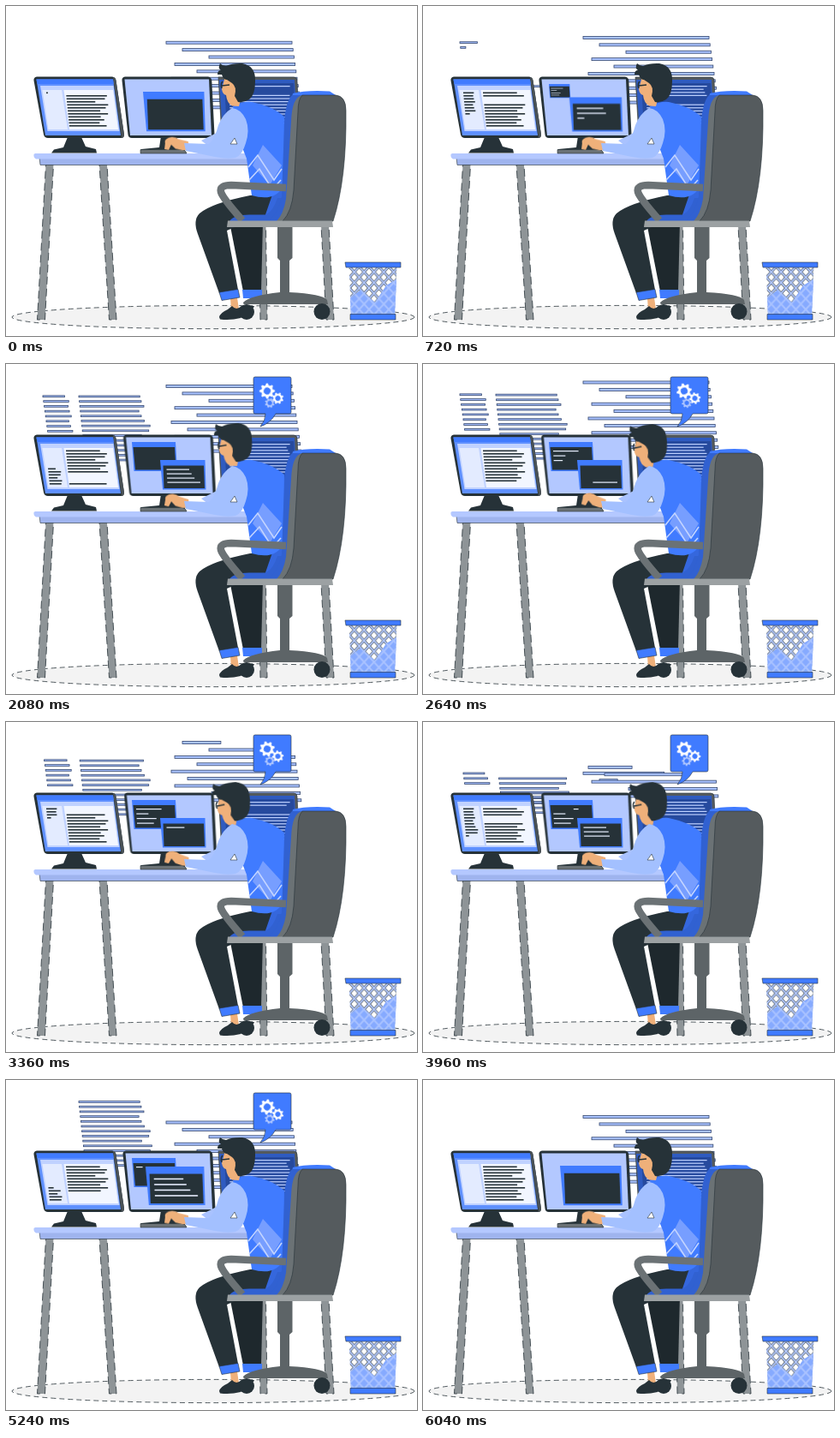
Recreate the animation shown at these times as an HTML page. Size 480 by 385 pixels, loop 6080 ms.

```html
<!DOCTYPE html>
<html lang="en">
<head>
<meta charset="utf-8">
<title>Programmer at a desk</title>
<style>
  html, body { margin: 0; width: 100%; height: 100%; overflow: hidden; background: #fff; }
  svg { display: block; width: 100vw; height: 100vh; }
  .ink { fill: #263238; }
  .blue { fill: #407bff; }
  .skin { fill: #efb07a; }
  .pale { fill: #a9c2ff; }
  .leg { fill: #8e9497; stroke: #263238; stroke-width: .8; stroke-dasharray: 9 5; }
  .edge { stroke: #263238; stroke-width: .6; }
  .fly rect { fill: #a9c2ff; stroke: #34476e; stroke-width: .8; }
  .head, .bubble, .win1, .win2, .mid { animation: 6080ms linear infinite; }
  .head { animation-name: nod; transform-origin: 275px 118px; }
  .bubble { animation-name: pop; transform-origin: 298px 73px; }
  .win1 { animation-name: open; transform-origin: 147px 91px; }
  .win2 { animation-name: resize; transform-origin: 0 0; }
  .mid { animation-name: nudge; }
  .hand { animation: type 380ms ease-in-out infinite alternate; transform-origin: 214px 164px; }
  .gear { transform-box: fill-box; transform-origin: center; animation: spin 6080ms linear infinite; }
  .back { animation-direction: reverse; }
  @keyframes nod {
    0%, 30%, 85%, 100% { transform: none; }
    37%, 76% { transform: translate(-3.5px, 3px) rotate(-5deg); }
  }
  @keyframes pop {
    0%, 14% { transform: scale(0); }
    19%, 95.5% { transform: scale(1); }
    98.5%, 100% { transform: scale(0); }
  }
  @keyframes open {
    0%, 9% { transform: scale(0); }
    15%, 93% { transform: scale(1); }
    96%, 100% { transform: scale(0); }
  }
  @keyframes resize {
    0%, 7% { transform: translate(160px, 100px) scale(1.36, 1.34); }
    16%, 76% { transform: translate(180px, 112px) scale(1); }
    86% { transform: translate(163px, 101px) scale(1.3); }
    93%, 100% { transform: translate(160px, 100px) scale(1.36, 1.34); }
  }
  @keyframes nudge {
    0%, 30%, 90%, 100% { transform: none; }
    37%, 80% { transform: translateX(2.5px); }
  }
  @keyframes type { from { transform: rotate(-2deg); } to { transform: rotate(5deg); } }
  @keyframes spin { to { transform: rotate(360deg); } }
</style>
</head>
<body>
<svg viewBox="0 0 480 385" preserveAspectRatio="none">
  <defs>
    <pattern id="mesh" x="401" y="304" width="11.500" height="12.500" patternUnits="userSpaceOnUse">
      <path d="M-1 -1.087 12.500 13.587M12.500 -1.087 -1 13.587" stroke="#263238" stroke-width="3"/>
      <path d="M-1 -1.087 12.500 13.587M12.500 -1.087 -1 13.587" stroke="#b5caff" stroke-width="1.800"/>
    </pattern>
    <pattern id="softMesh" x="401" y="304" width="11.500" height="12.500" patternUnits="userSpaceOnUse">
      <path d="M-1 -1.087 12.500 13.587M12.500 -1.087 -1 13.587" stroke="#a9c2ff" stroke-width="2"/>
    </pattern>
  </defs>

  <ellipse cx="242" cy="363" rx="235" ry="13.6" fill="#f3f3f3" stroke="#263238" stroke-width=".8" stroke-dasharray="6 4"/>

  <g class="fly" id="fly"></g>

  <!-- right monitor -->
  <path class="edge" fill="#555b5e" d="M248 83H336Q340 83 340 87L343 152H252Z"/>
  <path fill="#2f5bc0" d="M249 86H337L340 149H253Z"/>
  <path fill="#264a9e" d="M255 90H336L339 145H258Z"/>
  <g id="rightCode" fill="#bdd0ff"></g>

  <!-- left monitor -->
  <path class="ink" d="M72 153H88L93 164 105 167 106 171.500H53L56 167.500 67 165Z"/>
  <path class="ink" d="M36 82.500H124Q128 83 128.500 87L138 150Q138 154 134 154H49Q45 154 44 150L32.500 87Q32 83 36 82.500Z"/>
  <path fill="#4a5256" d="M125 83Q128 83 128.500 87L138 150Q138 154 135 154Z"/>
  <path fill="#5f90ff" d="M35.500 85.500H125L134 151H46Z"/>
  <path class="blue" d="M35.500 85.500H125L125.800 91H36.500Z"/>
  <path fill="#c0d2ff" d="M40 93H125.500L132.500 146H48.500Z"/>
  <path fill="#e3ebff" d="M42.500 98H65L72 144H49.500Z"/>
  <path fill="#f2f6ff" d="M67.500 98H125L131 144H74Z"/>
  <g id="leftCode" class="ink"></g>

  <!-- middle monitor -->
  <path class="ink" d="M181 152H199L202 165H209V171H158V167L179 165Z"/>
  <g class="mid">
    <path class="ink" d="M139 82.500H236Q240 83 240.300 87L243.500 150Q243 154 239 154H147Q143 154 142.500 150L135.500 87Q135 83 139 82.500Z"/>
    <path fill="#b3c8ff" d="M138.500 85.500H237L240 151H145Z"/>
  </g>
  <g class="win1">
    <path class="blue" d="M147 91H198L200 125H149.500Z"/>
    <path class="ink" d="M148.500 97H197L198.500 123.500H151Z"/>
    <g id="text1" fill="#e8efff"></g>
  </g>
  <g class="win2">
    <path class="blue" d="M0 0H52.500L53.500 34.500H3Z"/>
    <path class="ink" d="M3.500 6.500H51L52 33H4.500Z"/>
    <g id="text2" fill="#e8efff"></g>
  </g>

  <!-- desk -->
  <path class="leg" d="M46.500 185H55.500L45.500 366H36.500Z"/>
  <path class="leg" d="M109 185H118L129 366H120.500Z"/>
  <path class="leg" d="M295 256H303.500L305 366H297Z"/>
  <path class="leg" d="M368 256H377L383 366H374Z"/>
  <path class="edge" fill="#9fb4ee" d="M39 177H292V185.500H40Z"/>
  <path fill="#b4c8ff" d="M34 172H292V178.500H35Q32 177 32.500 173Z"/>
  <path class="edge" fill="#6b7275" d="M157 167.500H206Q210 168 211 172H157Z"/>

  <!-- legs and shoe -->
  <path fill="#1e282d" d="M261 252H300L298 333H277Z"/>
  <path class="blue" d="M276 331H299V341H277Z"/>
  <path class="skin" d="M262 341L270 340 272 354H263Z"/>
  <path class="ink" d="M312 220L285 221Q240 230 226 242Q218 250 224 266L249 335 271 331 258 262Q282 250 326 248Z"/>
  <path class="blue edge" d="M249 334L271 330.500L273 340L252 343.500Z"/>
  <path class="ink" d="M249 363Q250 358 259 354L264 350Q269 356 275 350H290Q289 354 283 355L274 364Q262 367 250 365.500Z"/>

  <!-- far arm, torso -->
  <path class="pale" d="M228 157L250 146 262 158 236 163Z"/>
  <path fill="#3567dd" d="M326 125L338 100 330 252H300L318 200Z"/>
  <path class="blue" d="M265 117Q276 111 287 112Q312 117 325 129L324 210Q314 229 287 221L281 178 270 150Z"/>
  <path fill="#779eff" d="M300 162L322 186 308 209 288 186Z"/>
  <path fill="none" stroke="#c3d4ff" stroke-width="1.600" d="M283 188L294 174 313 203 322 190M284 203L296 190 311 214 321 203"/>
  <path fill="#3161d1" d="M261 251Q266 243.500 284 243.500H303Q312 240 317 224H331V251Z"/>

  <!-- head -->
  <g class="head">
    <path class="skin" d="M256 82L252 97Q253 103 257 104Q258 113 264 116.500L272 117 275 106 268 84Z"/>
    <path class="ink" d="M247 80Q247 75 251 75Q247 72 250 67Q253 70 257 70Q264 66.500 276 67Q292 70 291 88Q291 104 284 109Q278 113 271 112L267 105Q270 94 264 90L258 86Q254 86 252 80Z"/>
    <path class="skin" d="M263 90Q258 91 260 97Q263 102 267 99Z"/>
    <path fill="none" stroke="#263238" stroke-width="1.500" d="M261 92L252 93M253 88Q250 91 252 96"/>
  </g>

  <!-- near arm and hand -->
  <g class="hand">
    <path class="skin" d="M213 158L202 155Q197 151 190 153Q185 155 186 159L185 166 190 167 193 161 198 166 206 168 214 168Z"/>
  </g>
  <path fill="#a3c0ff" d="M264 119Q274 120 280 132Q285 145 280 160Q276 174 268 177Q258 179 244 176L210 169 208 160 237 161Q244 155 248 139Q253 126 264 119Z"/>
  <path fill="#fff" class="edge" d="M262 161L267 154 270 161Z"/>

  <!-- chair -->
  <path class="blue" d="M335 102Q350 98 378 99.500L385 104 333 111Z"/>
  <path fill="#3161d1" d="M334 104Q326 112 325 140L322 222Q318 242 306 251H330L346 104Z"/>
  <path fill="#6b7275" d="M346 104Q334 106 333 135L327 225Q324 243 316 251H340L352 104Z"/>
  <path class="edge" fill="#555b5e" d="M346 104H385Q397 105 397 122Q398 202 382 251H323Q334 240 336 215L341 123Q341 109 346 104Z"/>
  <path fill="none" stroke="#6b7275" stroke-width="8.500" stroke-linejoin="round" d="M327 212L263 209Q249 209 251 217Q253 224 276 250"/>
  <path fill="#9ca1a3" d="M259 250.500H381L382 258H258Z"/>
  <path fill="#5d6467" d="M317 258H334.500V294L331 297V334Q370 336 375 343L376 348H282Q277 349 277 346Q284 338 320 334V297L317 294Z"/>
  <g class="ink"><circle cx="281" cy="357" r="9"/><circle cx="369" cy="356.500" r="9.500"/></g>

  <!-- bin -->
  <path fill="#fff" d="M400.500 304H456.500L454 361H403Z"/>
  <path fill="url(#mesh)" d="M400.500 304H456.500L454 361H403Z"/>
  <g id="paper">
    <path fill="#86aaff" d="M402 341L414 331 431 346 444 326 456 319 454 361H403Z"/>
    <path fill="url(#softMesh)" d="M402 341L414 331 431 346 444 326 456 319 454 361H403Z"/>
  </g>
  <path class="blue edge" d="M396 299H461V305H397Z"/>
  <path class="blue edge" d="M402 359.500H455V366H402Z"/>

  <g class="bubble">
    <path class="blue edge" d="M291 15H331Q333 15 333 17V56Q333 58 331 58H315Q309 69 297 73Q303 66 303 58H291Q289 58 289 56V17Q289 15 291 15Z"/>
    <g id="gears"></g>
  </g>
</svg>
<script>
const LOOP = 6080, HALF = LOOP / 2;
const $ = id => document.getElementById(id);
const clamp = v => Math.max(0, Math.min(1, v));
const mod = (a, n) => ((a % n) + n) % n;
const noise = n => mod(Math.sin(n * 12.9898) * 43758.5453, 1);

function add(parent, tag, attrs) {
  const el = document.createElementNS('http://www.w3.org/2000/svg', tag);
  for (const k in attrs) el.setAttribute(k, attrs[k]);
  return parent.appendChild(el);
}

function setWidth(el, w) {
  el.setAttribute('width', w.toFixed(2));
  el.style.display = w < .3 ? 'none' : '';
}

// Rising code lines: each grows from its left end, then shrinks back to it
function batch(o) {
  const bars = [];
  for (let i = 0; i < o.n; i++) {
    bars.push(add($('fly'), 'rect', { x: o.x(i), height: o.h }));
  }
  return time => bars.forEach((bar, i) => {
    const order = (i + (o.shift || 0)) % o.n;
    const grown = clamp((time - o.start - order * o.step) / o.grow);
    const gone = clamp((time - o.end - i * o.endStep) / o.shrink);
    setWidth(bar, o.w(i) * grown * (1 - gone));
    bar.setAttribute('y', o.top - o.speed * (time - o.at) / 1000 + i * o.gap);
  });
}

const indent = [187, 206, 237, 197, 223, 193, 212, 197, 240, 222];
const rightSide = { n: 10, h: 3, x: i => indent[i], w: i => 334 + i * 1.2 - indent[i],
  top: 53.8, at: 4520, speed: 8.05, gap: 8.4, start: 3800, step: 120, grow: 250,
  end: 2950 + LOOP, endStep: 150, shrink: 400 };
const column = { n: 14, h: 1.8, shift: 5, x: i => 85 + i * .6, w: i => 66 + 14 * noise(i + 4),
  gap: 5.7, grow: 150 };
const margin = { n: 8, h: 1.8, x: i => 43 + i * .8, w: i => 25 + 8 * noise(i + 2),
  top: 39, at: 1480, speed: 3.6, gap: 5.8, start: 600, step: 90, grow: 150,
  end: 2950, endStep: 200, shrink: 200 };
const batches = [
  batch(margin),
  batch({ ...column, top: 39, at: 1480, speed: 3.3, start: 600, step: 70, end: 3060, endStep: 150, shrink: 150 }),
  batch({ ...column, top: 27.5, at: 4520, speed: 4, start: 3750, step: 55, end: 5350, endStep: 40, shrink: 130 }),
  batch(rightSide)
];
const lastBatch = batch(rightSide);

// Code on the screens
function codeRows(id, n, x, y, gap, slant, width, height) {
  return Array.from({ length: n }, (_, i) => {
    const top = y + i * gap, w = width(i);
    const el = add($(id), 'rect', { x: x + i * gap * slant, y: top, height });
    return { el, y: top, w };
  });
}
const mainRows = codeRows('leftCode', 12, 70, 100.5, 3.5, .1, i => 30 + 18 * noise(i + 9), 1.6);
const sideRows = codeRows('leftCode', 12, 47, 100.5, 3.5, .1, i => 9 + 6 * noise(i + 3), 1.6);
const rightRows = codeRows('rightCode', 13, 260, 93, 3.6, .05, i => 66 + 9 * noise(i + 6), 1.2);
const rows1 = codeRows('text1', 4, 152, 101, 5.5, .06, i => 13 + 18 * noise(i + 1), 1.2);
const rows2 = codeRows('text2', 4, 7.5, 10.5, 5, .06, i => 24 + 15 * noise(i + 7), 1.2);

function typed(rows, s, start, step, end, endStep) {
  rows.forEach((r, i) => {
    const on = clamp((s - start - i * step) / step);
    const off = clamp((s - end - i * endStep) / endStep);
    setWidth(r.el, r.w * on * (1 - off));
    r.el.style.transform = `translateX(${r.w * off}px)`;
  });
}

// Gears
function gear(x, y, r, teeth, fill, cls) {
  const pts = [];
  for (let i = 0; i < teeth * 4; i++) {
    const a = (i + .5) / (teeth * 4) * Math.PI * 2;
    const d = i % 4 < 2 ? r : r * .75;
    pts.push([x + d * Math.cos(a), y + d * Math.sin(a)].map(v => v.toFixed(2)).join());
  }
  const g = add($('gears'), 'g', { class: 'gear ' + cls });
  add(g, 'polygon', { points: pts.join(' '), fill });
  add(g, 'circle', { cx: x, cy: y, r: r * .45, fill: '#407bff' });
}
gear(305, 31.5, 9, 8, '#fff', '');
gear(317.5, 40, 6.8, 8, '#fff', 'back');
gear(308, 45.5, 5.8, 8, '#b3c9ff', 'back');

function draw(now) {
  const t = mod(now - begin, LOOP), s = (t % HALF) / 1000;
  batches.forEach(b => b(t));
  lastBatch(t + LOOP);

  const hole = 97 + 17 * s;
  mainRows.forEach(r => setWidth(r.el, Math.abs(r.y - hole) < 4.6 ? 0 : r.w));
  rightRows.forEach(r => setWidth(r.el, Math.abs(r.y - hole) < 4 ? 0 : r.w));
  const front = 101 + 35 * s, tail = 127 + 38 * (s - 2.2);
  sideRows.forEach(r => setWidth(r.el, r.w * clamp((front - r.y) / 3.5) * clamp((r.y - tail) / 3.5 + 1)));

  typed(rows1, mod(s - 2, HALF / 1000), .15, .2, 1.8, .2);
  typed(rows2, s, .1, .28, 2.25, .12);
  requestAnimationFrame(draw);
}
const begin = performance.now();
draw(begin);
</script>
</body>
</html>
```
